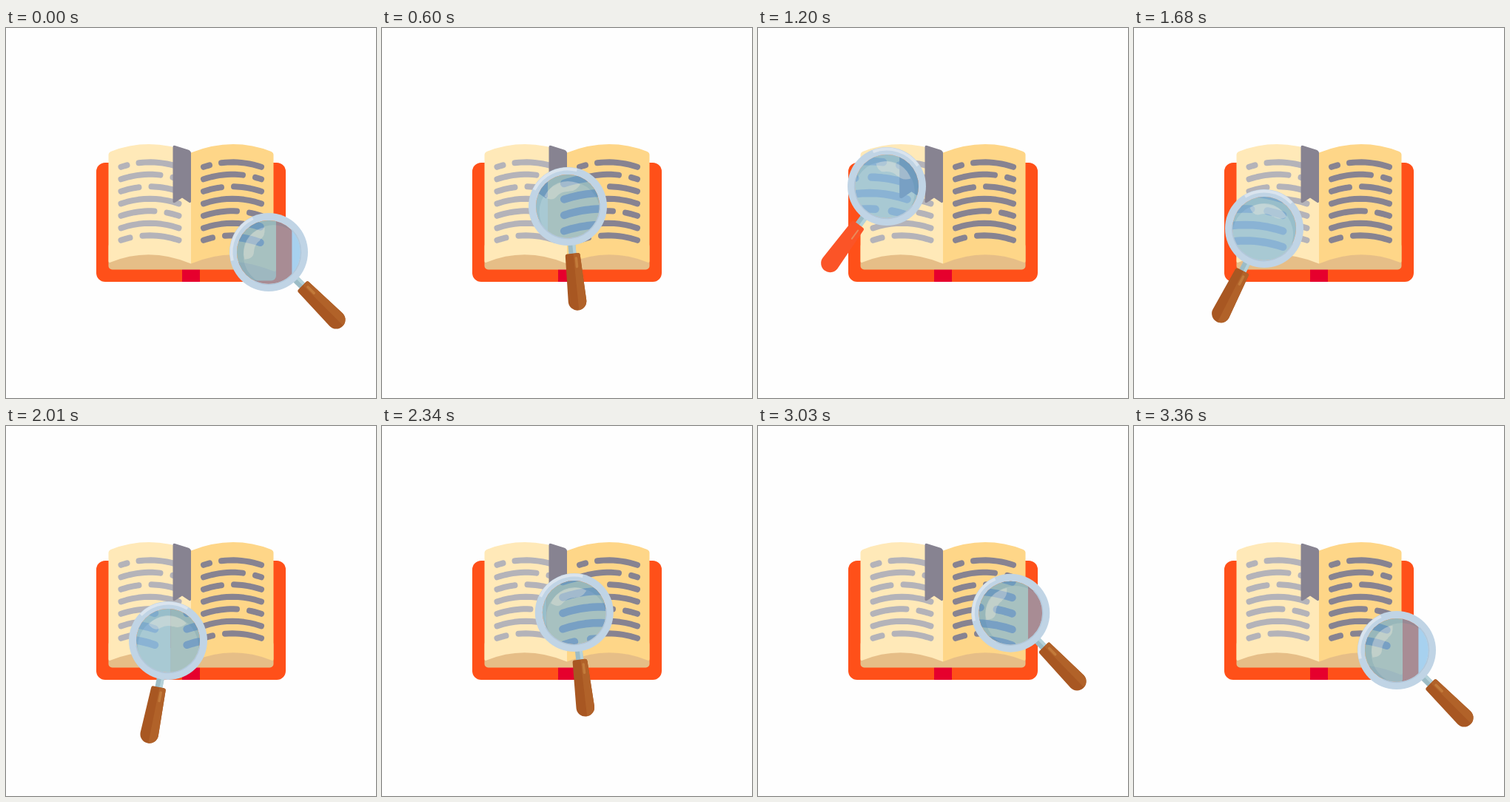
These frames come from a looping animation (500x500 px, 3690 ms). An HTML page with a canvas:

```html
<!DOCTYPE html>
<html lang="en">
<head>
<meta charset="utf-8">
<title>Book search</title>
<style>
html, body { margin: 0; width: 100%; height: 100%; overflow: hidden; background: #fefefe; }
canvas { display: block; width: 500px; height: 500px; }
</style>
</head>
<body>
<canvas id="stage" width="500" height="500"></canvas>
<script>
const ctx = document.getElementById('stage').getContext('2d');
const LOOP = 3690, STEP = 30, MOVE_END = 3360;
const RAD = Math.PI / 180;

// Rows of [time, value, ...]
const lensPath = [
  [0, 355, 303], [300, 304, 273], [600, 251, 241], [870, 203, 218], [1080, 177, 210],
  [1200, 174, 214], [1350, 171, 229], [1500, 170, 248], [1680, 176, 271],
  [1920, 207, 296], [2010, 219, 290], [2190, 241, 269], [2700, 305, 219],
  [2940, 335, 239], [3240, 351, 289], [3360, 355, 303]
];
const handleTurn = [
  [0, 45], [600, 84.2], [1200, 126.4], [1335, 133.5], [1680, 117], [2010, 101.3],
  [2700, 63.7], [3045, 45], [3360, 45]
];
const zoomShift = [
  [0, -105, -83], [600, -101, -77], [1200, -102, -77], [2700, -103, -77], [3360, -107, -76]
];

function segment(keys, t) {
  let i = 0;
  while (i < keys.length - 2 && t > keys[i + 1][0]) i++;
  return i;
}

function linear(keys, t) {
  const i = segment(keys, t), a = keys[i], b = keys[i + 1];
  const u = (t - a[0]) / (b[0] - a[0]);
  return a.slice(1).map((v, n) => v + (b[n + 1] - v) * u);
}

function smooth(keys, t) {
  const i = segment(keys, t), a = keys[i], b = keys[i + 1];
  const before = keys[Math.max(0, i - 1)], after = keys[Math.min(keys.length - 1, i + 2)];
  const span = b[0] - a[0], u = (t - a[0]) / span;
  return [1, 2].map(n => {
    const m0 = (b[n] - before[n]) / (b[0] - before[0]) * span;
    const m1 = (after[n] - a[n]) / (after[0] - a[0]) * span;
    return (1 + 2 * u) * (1 - u) ** 2 * a[n] + u * (1 - u) ** 2 * m0 +
      u * u * (3 - 2 * u) * b[n] + u * u * (u - 1) * m1;
  });
}

function fillPath(color, build) {
  ctx.fillStyle = color;
  ctx.beginPath();
  build();
  ctx.fill();
}

function box(color, x, y, w, h, r = 0) {
  fillPath(color, () => ctx.roundRect(x, y, w, h, r));
}

function disc(color, x, y, r) {
  fillPath(color, () => ctx.arc(x, y, r, 0, 7));
}

function arc(color, r, from, to, width) {
  ctx.strokeStyle = color;
  ctx.lineWidth = width;
  ctx.beginPath();
  ctx.arc(0, 0, r, from * RAD, to * RAD);
  ctx.stroke();
}

// Dashes of each text row, as x ranges from the row's left end
const textRows = [
  [[0, 8], [24, 78]], [[0, 53], [70, 78]], [[0, 24], [41, 78]], [[0, 78]],
  [[0, 45], [62, 78]], [[0, 78]], [[0, 12], [29, 78]]
];

function textLines(left, color) {
  ctx.strokeStyle = color;
  ctx.lineWidth = 8;
  ctx.lineCap = ctx.lineJoin = 'round';
  textRows.forEach((row, i) => row.forEach(([from, to]) => {
    ctx.beginPath();
    for (let k = 0; k <= 10; k++) {
      const x = from + (to - from) * k / 10;
      ctx.lineTo(left + x, 181.3 + i * 16.5 + 6.5 * ((x - 39) / 39) ** 2);
    }
    ctx.stroke();
  }));
  ctx.lineCap = 'butt';
}

function page(color, outer) {
  const inward = Math.sign(250 - outer), middle = (outer + 250) / 2;
  fillPath(color, () => {
    ctx.moveTo(250, 168.5);
    ctx.quadraticCurveTo(middle, 146.5, outer + 3 * inward, 167);
    ctx.quadraticCurveTo(outer, 168.5, outer, 171);
    ctx.lineTo(outer, 315);
    ctx.quadraticCurveTo(outer, 318, outer + 3 * inward, 316.5);
    ctx.quadraticCurveTo(middle, 295, 250, 318.5);
  });
}

function book() {
  box('#ff5019', 122, 182, 256, 161, 12);
  box('#e6002d', 238, 326, 24, 17);
  box('#e6be87', 138.5, 290, 223, 36.5, 5);
  page('#ffe9b8', 138.5);
  page('#fed688', 361.5);
  textLines(155.5, '#b4b3b9');
  textLines(267, '#878391');
  fillPath('#878391', () => {
    ctx.moveTo(225.5, 161);
    ctx.quadraticCurveTo(225.5, 158, 228.5, 159);
    ctx.lineTo(246, 164.5);
    ctx.quadraticCurveTo(250, 166, 250, 169);
    ctx.lineTo(250, 235);
    ctx.quadraticCurveTo(249, 237, 247, 235.5);
    ctx.lineTo(238, 229.5);
    ctx.lineTo(229, 235.5);
    ctx.quadraticCurveTo(226, 237, 225.5, 235);
  });
}

function handleShape() {
  ctx.moveTo(67, -10);
  ctx.quadraticCurveTo(64, -10, 64, -7);
  ctx.lineTo(64, 7);
  ctx.quadraticCurveTo(64, 10, 67, 10);
  ctx.lineTo(129, 12.3);
  ctx.arc(129, 0, 12.3, Math.PI / 2, -Math.PI / 2, true);
}

function handle(red) {
  box('#9cbcc6', 50, -5, 18, 10);
  box('#b5d2da', 50, -5, 18, 4);
  fillPath(red ? '#fb5427' : '#a85722', handleShape);
  if (red) {
    box('#e88a5a', 70, -5, 16, 2, 1);
    return;
  }
  ctx.save();
  ctx.beginPath();
  handleShape();
  ctx.clip();
  box('#b16229', 64, -13, 80, 12);
  box('#c27a3a', 69, -6, 15, 3.5, 1.7);
  ctx.restore();
}

function magnifier(t) {
  const [x, y] = smooth(lensPath, t), [angle] = linear(handleTurn, t);
  const [sx, sy] = linear(zoomShift, t);

  ctx.save();
  ctx.translate(x, y);
  ctx.rotate(angle * RAD);
  handle(t >= 1110 && t < 1350);
  ctx.restore();

  disc('#c0d4e5', x, y, 53);
  ctx.save();
  ctx.beginPath();
  ctx.arc(x, y, 43, 0, 7);
  ctx.clip();
  disc('#fefefe', x, y, 44);
  ctx.save();
  ctx.transform(1.3, 0, 0, 1.3, sx, sy);
  book();
  ctx.restore();
  disc('rgba(110,180,230,.6)', x, y, 44);

  // Shade and glare face away from the handle
  ctx.translate(x, y);
  ctx.rotate((angle + 167) * RAD);
  fillPath('rgba(60,120,150,.14)', () => {
    ctx.arc(0, 0, 44, 0, 7);
    ctx.arc(-8, 0, 41, 7, 0, true);
  });
  fillPath('rgba(240,235,220,.35)', () => {
    ctx.arc(0, 0, 34, -0.85, 0.85);
    ctx.quadraticCurveTo(15, 16, 19, 8);
    ctx.arc(0, 0, 20, 0.4, -0.5, true);
    ctx.quadraticCurveTo(12, -18, 22.4, -25.5);
  });
  ctx.restore();

  ctx.save();
  ctx.translate(x, y);
  ctx.rotate((angle + 170) * RAD);
  arc('#dae4ee', 50.5, -48, 30, 4);
  arc('#b0c8dc', 43.5, 100, 260, 1.5);
  ctx.restore();
}

function draw(now) {
  const t = Math.min(MOVE_END, Math.floor(now % LOOP / STEP) * STEP);
  box('#fefefe', 0, 0, 500, 500);
  book();
  magnifier(t);
}

let start;
function tick(now) {
  start ??= now;
  draw(Math.max(0, now - start));
  requestAnimationFrame(tick);
}
draw(0);
requestAnimationFrame(tick);
</script>
</body>
</html>
```
